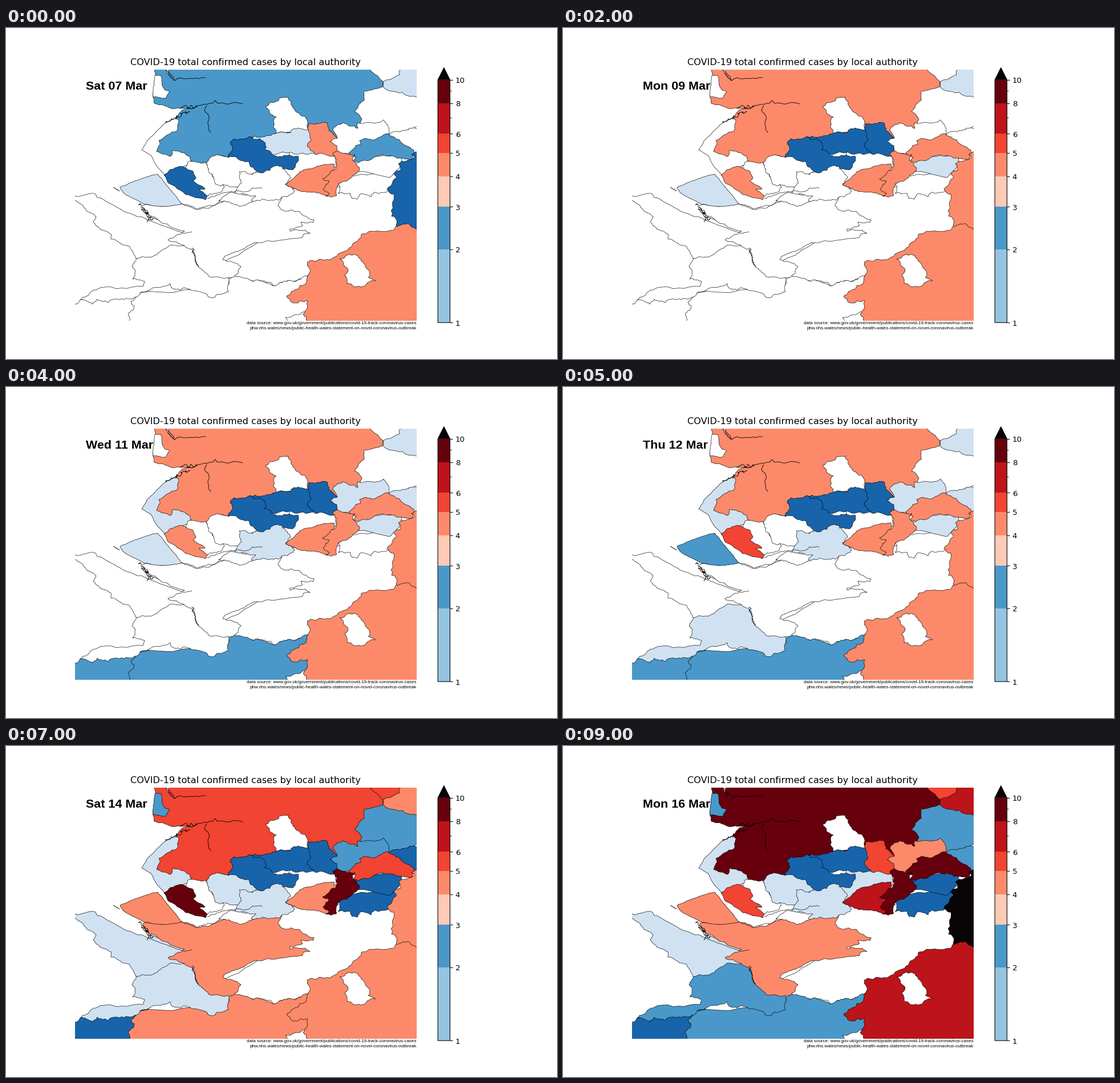
Animation of 966x580 px, one loop 10 s. Source, as a matplotlib script:

```python
import numpy as np
import matplotlib.pyplot as plt
from matplotlib.animation import FuncAnimation
from matplotlib.patches import Polygon, Rectangle

W, H, DPI = 966, 580, 100
K = 0.966                      # text and line scale
blues, reds = plt.cm.Blues, plt.cm.Reds
BLACK = "#080304"
SHADES = ["white", blues(0.2), blues(0.6), blues(0.8),
          reds(0.4), reds(0.6), reds(0.8), reds(1.0), BLACK]
DAYS = ["Sat", "Sun", "Mon", "Tue", "Wed", "Thu", "Fri"]

fig = plt.figure(figsize=(W / DPI, H / DPI), dpi=DPI, facecolor="white")
ax = fig.add_axes([0, 0, 1, 1])
ax.set_xlim(0, W)
ax.set_ylim(H, 0)
ax.axis("off")
frame = Rectangle((120.75, 72.5), 599, 440.5, fc="none", ec="none")
ax.add_patch(frame)
rng = np.random.default_rng(7)
areas = []


def rough(pts, amp):
    """Roughen a polyline by repeated midpoint displacement."""
    p = np.array(pts, float)
    for _ in range(3):
        d = np.diff(p, axis=0)
        size = np.hypot(*d.T)[:, None] + 1e-9
        normal = np.column_stack([-d[:, 1], d[:, 0]]) / size
        push = rng.uniform(-amp, amp, size.shape) * np.minimum(size, 14)
        out = np.empty((2 * len(p) - 1, 2))
        out[::2], out[1::2] = p, p[:-1] + d / 2 + normal * push
        p = out
    return p


def area(levels, *pts, amp=0.2):
    """Add a district; levels maps the day of a change to its new shade."""
    patch = Polygon(rough(pts + pts[:1], amp), ec="black", lw=0.45,
                    joinstyle="round")
    ax.add_patch(patch)
    patch.set_clip_path(frame)
    areas.append((patch, levels))


def line(*pts, amp=0.15, lw=0.45):
    x, y = rough(pts, amp).T
    ax.plot(x, y, color="black", lw=lw)[0].set_clip_path(frame)


def creeks(start, end, spread, n=12):
    """Scribble an inlet's channels from start to end."""
    t = np.linspace(0, 1, n)[:, None]
    line(*(np.array(start) * (1 - t) + np.array(end) * t
           + rng.uniform(-spread, spread, (n, 2))), amp=0.3, lw=0.6)


# Districts are painted in order: later ones cover their neighbours' edges.
# South
area({8: 1, 9: 0}, (475, 285), (690, 270), (700, 350), (545, 430), (530, 433),
     (511, 442), (480, 446), (470, 452), (448, 443), (435, 444), (400, 434),
     (370, 420), (470, 360))
area({6: 1}, (100, 297), (121, 294), (157, 291), (160, 297), (200, 317),
     (250, 337), (253, 331), (312, 355), (310, 390), (240, 410), (228, 404),
     (217, 383), (184, 370), (184, 361), (165, 353), (153, 340), (158, 331),
     (141, 320), (135, 311), (121, 302), amp=0.13)
area({4: 2, 6: 3}, (100, 492), (121, 484), (131, 476), (250, 460),
     (250, 530), (100, 530))
area({3: 1, 4: 2, 6: 3, 7: 4, 9: 2}, (213, 530), (217, 508), (214, 500),
     (225, 488), (219, 480), (232, 465), (390, 450), (390, 440), (400, 434),
     (435, 444), (448, 443), (470, 452), (480, 446), (511, 442), (530, 433),
     (545, 450), (545, 530))
area({}, (493, 530), (490, 507), (510, 502), (527, 498), (545, 530))
area({5: 1, 9: 2}, (228, 404), (258, 400), (268, 393), (290, 380),
     (340, 380), (390, 438), (390, 462), (377, 467), (362, 473), (350, 465),
     (312, 455), (306, 459), (294, 457), (288, 448), (240, 462), (224, 473),
     (190, 475), (180, 481), (160, 475), (152, 484), (131, 476), (148, 463),
     (165, 455), (240, 453), (243, 444), (222, 440), (227, 426), (221, 418))
area({6: 3, 7: 4}, (240, 311), (275, 313), (308, 308), (333, 317), (365, 311),
     (400, 300), (478, 290), (484, 296), (477, 312), (487, 320), (512, 321),
     (519, 327), (540, 336), (538, 341), (517, 340), (520, 346), (498, 352),
     (498, 356), (525, 354), (533, 360), (522, 361), (520, 367), (438, 376),
     (410, 390), (383, 400), (380, 406), (412, 418), (407, 430), (398, 437),
     (355, 435), (337, 418), (328, 391), (312, 381), (284, 371), (313, 356),
     (253, 329), (243, 320), amp=0.16)
area({0: 1, 5: 2, 6: 4}, (200, 279), (235, 265), (266, 256), (281, 275),
     (308, 308), (275, 313), (243, 309), (232, 303), (205, 288), amp=0.06)
area({0: 4, 8: 5, 9: 6}, (740, 340), (690, 335), (680, 354), (624, 361),
     (622, 368), (605, 384), (580, 400), (545, 408), (528, 410), (530, 433),
     (527, 447), (515, 451), (513, 457), (492, 470), (505, 482), (529, 478),
     (527, 494), (521, 502), (528, 513), (528, 530), (740, 530))
area({}, (585, 404), (602, 396), (612, 397), (627, 412), (638, 430),
     (635, 437), (648, 443), (622, 454), (598, 448), (594, 434), (600, 424))
# North-east
area({6: 2, 8: 4, 9: 2}, (600, 100), (740, 90), (740, 174), (707, 176),
     (675, 188), (600, 190))
area({4: 1, 7: 3, 9: 2}, (665, 188), (690, 182), (707, 176), (740, 174),
     (740, 230), (700, 220))
area({0: 1, 6: 4, 8: 5, 9: 6}, (650, 60), (740, 60), (740, 121), (705, 119),
     (661, 103))
area({6: 4, 7: 5, 8: 6, 9: 5}, (620, 60), (690, 60), (690, 82), (680, 87),
     (661, 94), (640, 95))
# West coast and the middle
area({4: 1}, (302, 154), (275, 170), (247, 198), (238, 214), (254, 223),
     (263, 240), (278, 257), (318, 240), (335, 220), (320, 180), amp=0.06)
area({}, (314, 250), (318, 236), (350, 225), (353, 241), (364, 262),
     (383, 279), (379, 286), (352, 295), (330, 290))
area({7: 1}, (350, 236), (355, 220), (430, 225), (440, 250), (411, 276),
     (400, 278), (368, 274), (364, 262), (353, 242))
area({}, (373, 303), (388, 291), (438, 288), (440, 302), (405, 310),
     (392, 305))
area({0: 2, 1: 4, 6: 5, 9: 7}, (261, 60), (620, 60), (661, 94), (660, 103),
     (628, 111), (628, 127), (618, 135), (611, 147), (619, 152), (624, 160),
     (615, 190), (570, 200), (400, 215), (389, 226), (369, 222), (357, 228),
     (352, 236), (325, 234), (323, 226), (304, 216), (292, 214), (289, 225),
     (264, 216), (270, 204), (268, 197), (300, 180), (303, 162), (298, 158),
     (303, 150), (310, 143), (330, 140), (285, 139), (260, 132), (258, 122),
     (262, 82), amp=0.12)
area({}, (278, 68), (286, 68), (284, 78), (295, 92), (283, 80), amp=0.1)
area({6: 2, 8: 3, 9: 2}, (261, 83), (271, 83), (278, 108), (287, 112),
     (280, 123), (258, 121), (258, 104), amp=0.1)
area({}, (455, 137), (473, 129), (480, 122), (495, 121), (503, 140),
     (524, 155), (535, 185), (474, 185), (469, 174), (474, 156), (462, 150))
area({8: 1}, (478, 235), (500, 215), (540, 215), (575, 222), (577, 245),
     (488, 276), (484, 250))
area({4: 1}, (409, 252), (432, 257), (447, 248), (482, 235), (484, 247),
     (499, 263), (490, 273), (506, 285), (503, 290), (484, 296), (470, 302),
     (430, 303), (438, 294), (401, 288), (413, 271))
area({0: 1, 1: 2, 2: 3}, (430, 191), (456, 189), (474, 184), (499, 183),
     (505, 176), (533, 178), (545, 222), (506, 221), (450, 220))
area({0: 4, 1: 3, 9: 5}, (530, 168), (562, 166), (566, 180), (590, 195),
     (590, 214), (580, 226), (541, 221), (528, 207), (535, 196))
area({0: 3}, (393, 203), (400, 194), (428, 190), (434, 196), (445, 194),
     (456, 208), (453, 213), (480, 225), (513, 225), (505, 246), (487, 247),
     (476, 241), (447, 254), (428, 242), (424, 234), (389, 227), (397, 210))
# East
area({6: 2, 7: 3}, (600, 258), (690, 250), (690, 270), (679, 274), (668, 287),
     (645, 288), (640, 296), (620, 292), (616, 300), (607, 299), (604, 290),
     (582, 290), (583, 273))
area({4: 1, 6: 2, 9: 4}, (573, 180), (580, 170), (590, 166), (617, 176),
     (616, 166), (662, 161), (668, 169), (672, 187), (610, 222), (583, 220),
     (580, 206), (568, 199), (581, 193))
area({0: 4, 8: 5, 9: 6}, (490, 275), (515, 252), (545, 242), (575, 238),
     (572, 290), (561, 294), (545, 289), (510, 284), amp=0.13)
area({1: 1, 7: 3}, (605, 238), (620, 225), (690, 220), (693, 233), (673, 262),
     (610, 252))
area({0: 2, 2: 4, 6: 5, 9: 7}, (601, 219), (613, 206), (622, 204),
     (620, 197), (650, 194), (670, 185), (690, 196), (715, 214), (712, 231),
     (660, 222), (618, 236), (609, 234), (614, 226), amp=0.15)
area({0: 4, 6: 6, 7: 7}, (573, 220), (583, 216), (612, 222), (607, 232),
     (620, 246), (617, 252), (583, 273), (580, 293), (561, 295), (567, 290),
     (556, 282), (567, 268), (555, 264), (568, 254), (577, 248), (580, 231))
area({0: 3, 1: 4, 8: 8}, (740, 217), (718, 217), (711, 222), (716, 227),
     (688, 238), (692, 249), (680, 255), (684, 263), (668, 284), (680, 291),
     (676, 330), (685, 337), (684, 347), (697, 343), (720, 353), (740, 356))
area({0: 3, 1: 4, 5: 5, 6: 7, 9: 5}, (277, 258), (288, 248), (310, 243),
     (328, 251), (333, 262), (328, 268), (336, 274), (349, 282), (338, 283),
     (353, 295), (350, 301), (315, 292), (285, 272), amp=0.1)

# Rivers, inlets and islets
line((353, 299), (380, 289), (420, 287), (432, 280), (449, 281))
line((308, 308), (337, 317), (365, 311), (375, 302))
line((250, 337), (290, 352), (312, 360), (326, 357), amp=0.04)
line((330, 140), (362, 132), (367, 127), (371, 132), (415, 133), lw=0.6)
line((352, 136), (348, 144), (356, 156), (354, 167), (359, 183), lw=0.6)
line((280, 73), (296, 92), (304, 87), (350, 87), lw=0.6)
creeks((302, 139), (335, 138), 3)
creeks((298, 156), (324, 145), 4)
creeks((278, 164), (300, 158), 2, 6)
creeks((234, 305), (250, 339), 4)
creeks((242, 320), (257, 336), 4)
creeks((327, 385), (336, 417), 2.5)
creeks((189, 279), (199, 285), 0.7, 4)


def label(x, y, s, size, family="DejaVu Sans", va="baseline", **kw):
    return ax.text(x, y, s, fontsize=size * K, family=family, va=va, **kw)


# Colour bar on a log scale
def bar_y(v):
    return 516.2 - 425.3 * np.log10(v)


X0, X1 = 757.1, 778.4
top, low, tip = bar_y(10), bar_y(1), ((X0 + X1) / 2, 69.6)
steps = [1, 2, 3, 4, 5, 6, 8, 10]
fills = [blues(0.4), blues(0.6)] + [reds(k / 5) for k in range(1, 6)]
for lo, hi, c in zip(steps, steps[1:], fills):
    ax.add_patch(Rectangle((X0, bar_y(hi)), X1 - X0, bar_y(lo) - bar_y(hi),
                           fc=c, ec="none"))
ax.add_patch(Polygon([(X0, top), tip, (X1, top)], fc=BLACK, ec="none"))
ax.add_patch(Polygon([(X0, low), (X0, top), tip, (X1, top), (X1, low)],
                     fc="none", ec="black", lw=0.8 * K))
for v in range(1, 11):
    major = v in steps
    ax.plot([X1, X1 + (4.7 if major else 2.7)], [bar_y(v)] * 2, color="black",
            lw=(0.8 if major else 0.6) * K, solid_capstyle="butt")
    if major:
        label(787.8, bar_y(v) + 0.3, str(v), 10, va="center_baseline")

label(420.2, 65, "COVID-19 total confirmed cases by local authority", 12,
      ha="center")
label(720, 519, "data source: www.gov.uk/government/publications/"
      "covid-19-track-coronavirus-cases", 6, "Liberation Sans", ha="right")
label(720, 527.5, "phw.nhs.wales/news/public-health-wales-statement-"
      "on-novel-coronavirus-outbreak", 6, "Liberation Sans", ha="right")
date = label(140.5, 108, "", 16, "Liberation Sans", weight="bold")


def update(day):
    for patch, levels in areas:
        last = max((d for d in levels if d <= day), default=None)
        patch.set_facecolor(SHADES[levels.get(last, 0)])
    date.set_text(f"{DAYS[day % 7]} {day + 7:02d} Mar")
    return [date]


anim = FuncAnimation(fig, update, frames=10, interval=1000, repeat=True,
                     blit=False)
plt.show()
```
